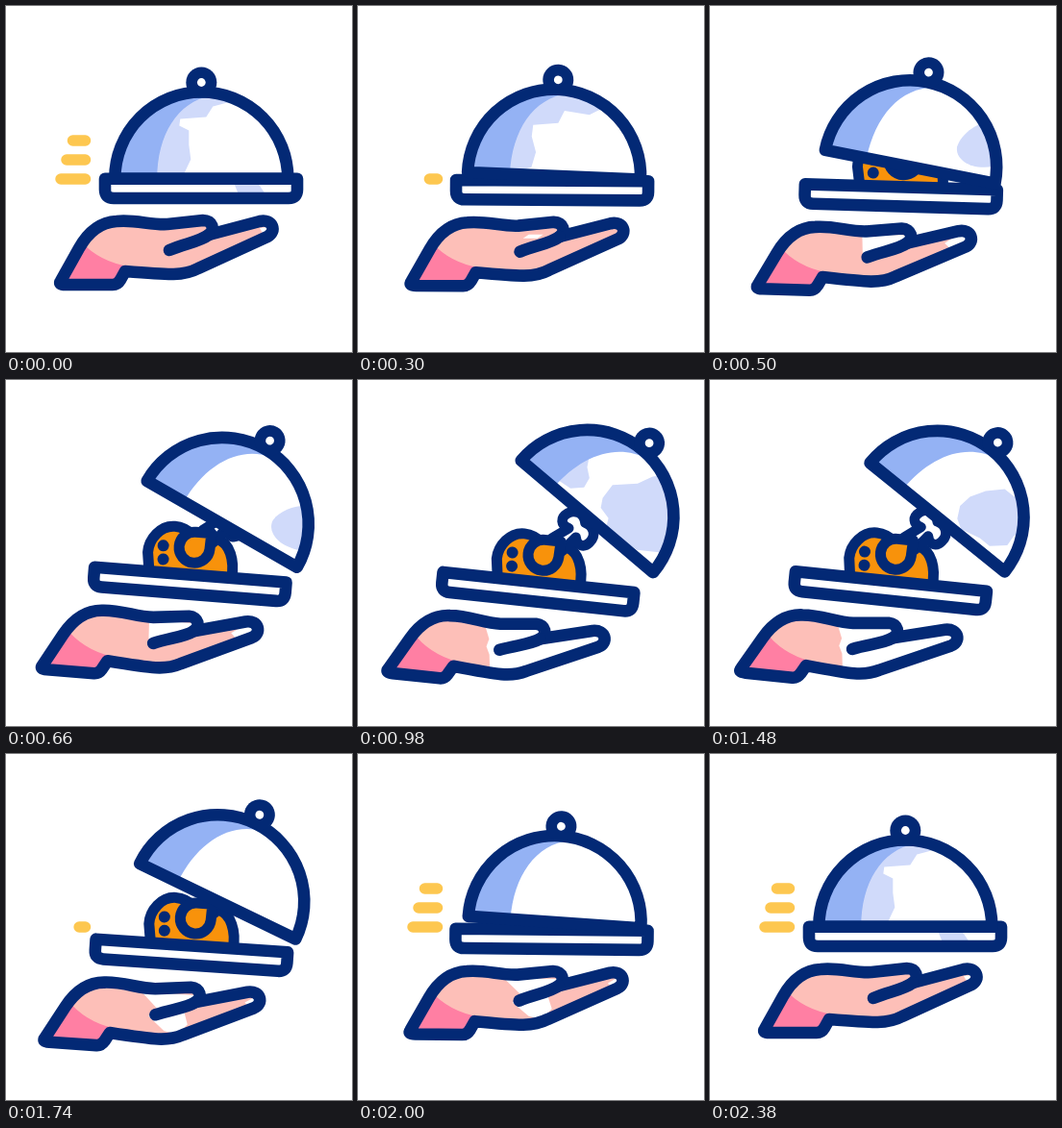
These frames come from a looping animation (360x360 px, 2.4 s). An HTML page with a canvas:

```html
<!DOCTYPE html>
<html lang="en">
<head>
<meta charset="utf-8">
<title>Serving dish</title>
<style>
html, body { margin: 0; width: 100%; height: 100%; overflow: hidden; background: #fff; }
canvas { display: block; width: 360px; height: 360px; }
</style>
</head>
<body>
<canvas id="stage" width="360" height="360"></canvas>
<script>
const ctx = document.getElementById('stage').getContext('2d');
const LOOP = 2400, HALF = 1200, MOVE = 1160;
const NAVY = '#032975', BLUE = '#94b2f4', LAVENDER = '#d0dafa', WHITE = '#fff';
const SKIN = '#fdbfb8', CUFF = '#ff7fa3', ORANGE = '#f8920b', YELLOW = '#fdc750';
const RAD = Math.PI / 180;

const shape = d => new Path2D(d);
const hand = shape('M57 286L76 252C85 236 97 225 115 224C135 222 150 228 168 227L205 223C215 223 218 233 211 238L264 224C278 221 282 235 272 240L200 273C185 281 172 280 124 276L119 285Q116 290 111 290H62Q54 290 57 286Z');
const thumb = shape('M211 238C202 245 187 247 170 254');
const cuff = shape('M78 245Q97 266 128 271V300H40Z');
const plate = shape('M103 179.8H303V191Q303 200 294 200H112Q103 200 103 191Z');
const plateShade = shape('M237 184H262L270 196H242Z');
const chicken = shape('M160 180L157 160C157 146 168 131 183 131C191 131 197 134 203 139L229 141C241 144 248 161 246 180Z');
const meat = shape('M23 0L11.1 11.5A16 16 0 1 1 11.1 -11.5Z');
const bone = shape('M18 -8.5L38 -6C33 -14 38 -20 46 -19C56 -18 60 -8 55 0C60 8 56 18 46 19C38 20 33 14 38 6L18 8.5Z');
// The dome is drawn around the middle of its base.
const dome = shape('M-90 0A90 90 0 0 1 90 0Z');
const domeShade = shape('M10 -86C-25 -80 -46 -45 -46 0H-100V-100H10Z');

// Gloss on the dome and bright patches on the hand, each until its end time.
const restGloss = 'M-50 0V-60L0 -95L36 -84L27 -79L12 -75L5 -64L-22 -62L-23 -55L-13 -50L-13 -35L-11 -20L-18 -5Z';
const restGlint = 'M264 231L272 230V236L268 238Z';
const schedule = list => list.map(([end, d]) => [end, shape(d)]);
const glosses = schedule([
  [140, restGloss],
  [480, 'M-50 0V-60L0 -95L50 -74L34 -65L8 -68L2 -55L-24 -52L-25 -40L-20 -24L-24 -8Z'],
  [820, 'M80 -66C60 -60 46 -45 44 -30C44 -18 60 -8 85 -17V-40Z'],
  [1230, 'M-49 -9L-46 -46H-37L-33 -39L-24 -32L-22 -21L-32 -11ZM5 -16L0 -25L-1 -42L18 -60L25 -75L34 -87H95V-21H83L62 -7L23 -3L18 -13Z'],
  [1740, 'M17 -12L11 -24L13 -38L22 -53L36 -67H49L63 -74H90L82 -51L74 -35L75 -23L61 -11H48L27 -6Z'],
  [2190, ''],
  [LOOP, restGloss]
]);
const glints = schedule([
  [150, restGlint],
  [480, 'M173 240L179 236H194L188 240Z'],
  [820, 'M164 230H215V240L190 246L165 250ZM250 237L272 222L288 236L262 248Z'],
  [1740, 'M153 232L158 244L156 252L160 260L164 290H290V215H153Z'],
  [2190, 'M154 231H212L214 241L200 250L204 262L194 273L180 270L163 256L172 248ZM262 235L270 230L280 236L268 241Z'],
  [LOOP, restGlint]
]);
const at = (list, t) => list.find(([end]) => t < end)[1];

const clamp = x => Math.min(1, Math.max(0, x));

// Strong ease in and out: cubic-bezier(.75, 0, .25, 1).
function ease(x) {
  let lo = 0, hi = 1, s = 0.5;
  for (let i = 0; i < 24; i++) {
    s = (lo + hi) / 2;
    const bx = 2.25 * s * (1 - s) ** 2 + 0.75 * s * s * (1 - s) + s ** 3;
    if (bx < x) lo = s; else hi = s;
  }
  return s * s * (3 - 2 * s);
}

function fill(path, color) {
  ctx.fillStyle = color;
  ctx.fill(path);
}

function outline(path, width = 12.6) {
  ctx.strokeStyle = NAVY;
  ctx.lineWidth = width;
  ctx.stroke(path);
}

function disc(x, y, r, color) {
  ctx.fillStyle = color;
  ctx.beginPath();
  ctx.arc(x, y, r, 0, 2 * Math.PI);
  ctx.fill();
}

function scoped(draw) {
  ctx.save();
  draw();
  ctx.restore();
}

function drawHand(t) {
  fill(hand, SKIN);
  scoped(() => {
    ctx.clip(hand);
    fill(cuff, CUFF);
    fill(at(glints, t), WHITE);
  });
  outline(hand);
  outline(thumb);
}

function drawChicken() {
  fill(chicken, ORANGE);
  outline(chicken, 11);
  disc(172.5, 151.9, 6, NAVY);
  disc(173.5, 166, 6, NAVY);
  scoped(() => {
    ctx.translate(205, 151.2);
    ctx.rotate(-44 * RAD);
    fill(bone, WHITE);
    outline(bone, 10.5);
    fill(meat, ORANGE);
    outline(meat, 11);
  });
}

function drawPlate(t) {
  fill(plate, WHITE);
  if (t < 140 || t > 2190) fill(plateShade, LAVENDER);
  outline(plate);
}

function drawDome(t, p) {
  ctx.translate(203.3 + 11.2 * p + 25 * p * p, 179.5 - 47.6 * p + 9.5 * p * p);
  ctx.rotate(41 * p * RAD);
  fill(dome, WHITE);
  scoped(() => {
    ctx.clip(dome);
    fill(at(glosses, t), LAVENDER);
    fill(domeShade, BLUE);
  });
  outline(dome);
  disc(0, -100, 16, NAVY);
  disc(0, -100, 4.4, WHITE);
}

function drawDashes(t) {
  ctx.strokeStyle = YELLOW;
  ctx.lineWidth = 11.5;
  [[69.5, 0, 1820], [63, 60, 1760], [57, 150, 1700]].forEach(([left, out, back], i) => {
    const shown = t < HALF ? 1 - clamp((t - out) / 220) : clamp((t - back) / 160);
    if (!shown) return;
    const y = 140 + 20 * i;
    ctx.beginPath();
    ctx.moveTo(82.5 - (82.5 - left) * shown, y);
    ctx.lineTo(82.5, y);
    ctx.stroke();
  });
}

function render(now) {
  const t = now % LOOP;
  const p = t < HALF ? ease(clamp(t / MOVE)) : 1 - ease(clamp((t - HALF) / MOVE));
  ctx.fillStyle = WHITE;
  ctx.fillRect(0, 0, 360, 360);
  ctx.lineCap = ctx.lineJoin = 'round';
  drawDashes(t);
  scoped(() => {
    ctx.translate(203 - 16.4 * p, 190 + 31.2 * p);
    ctx.rotate(6.2 * p * RAD);
    ctx.translate(-203, -190);
    drawHand(t);
    if (p > 0.02) drawChicken();
    drawPlate(t);
  });
  scoped(() => drawDome(t, p));
}

let start;
function tick(now) {
  start ??= now;
  render(now - start);
  requestAnimationFrame(tick);
}
render(0);
requestAnimationFrame(tick);
</script>
</body>
</html>
```
